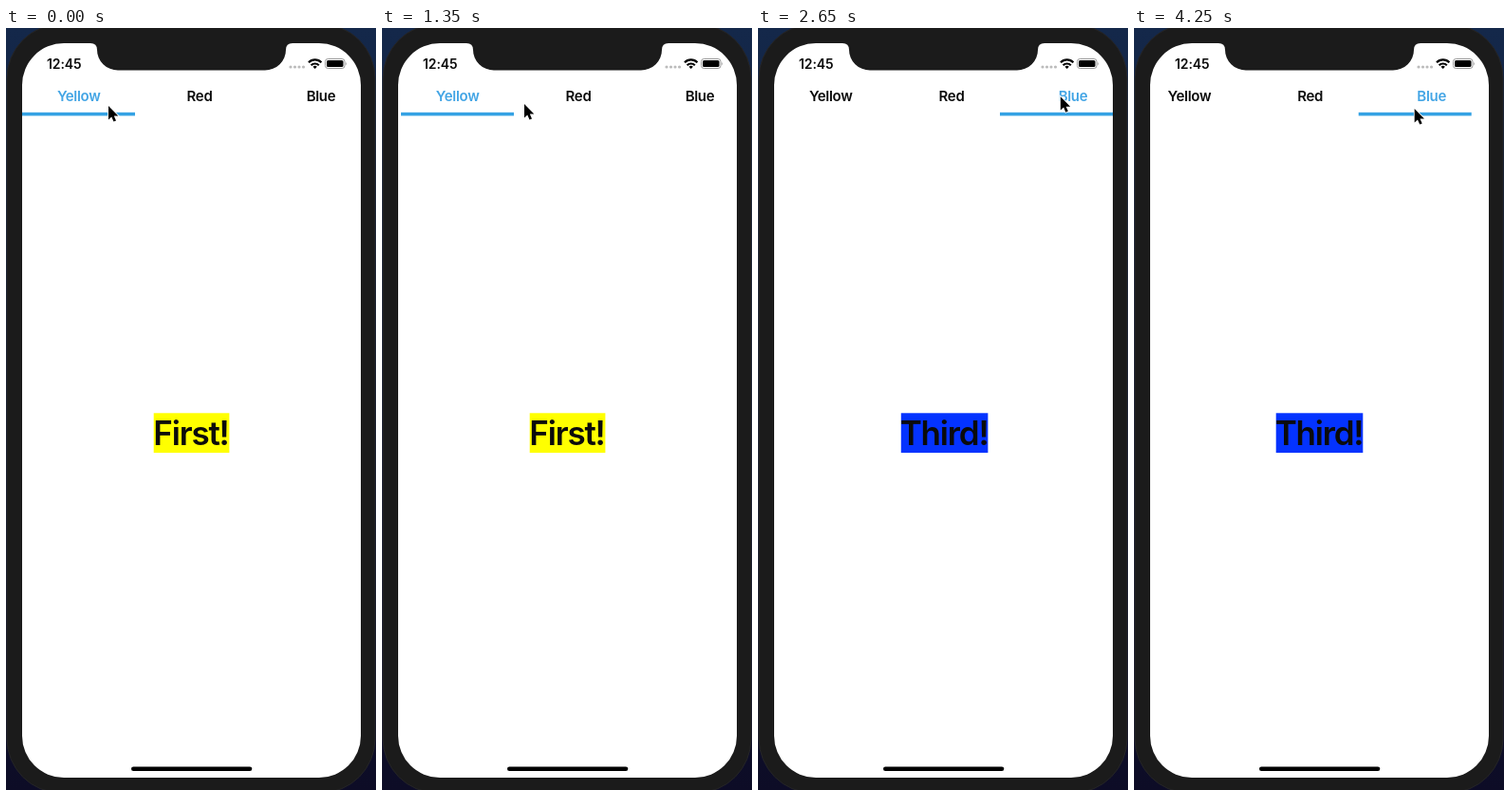
An HTML page that plays this animation: 390x802 px, repeating every 4.3 s.

```html
<!DOCTYPE html>
<html lang="en">
<head>
<meta charset="utf-8">
<title>Paged tabs</title>
<style>
html, body { margin: 0; width: 100%; height: 100%; overflow: hidden; background: #0f1a33; }
svg { display: block; width: 390px; height: 802px; }
text { font-family: Inter, sans-serif; font-weight: 600; fill: #0b0b0b; }
#tabs text { font-size: 15px; letter-spacing: -.3px; text-anchor: middle; }
#tabs .active { fill: #43a5e5; }
#pages text { font-size: 35px; letter-spacing: -1.2px; text-anchor: middle; }
</style>
</head>
<body>
<svg viewBox="0 0 390 802">
  <defs>
    <linearGradient id="desk" x2="0" y2="1">
      <stop stop-color="#14284a"/><stop offset="1" stop-color="#0d0c26"/>
    </linearGradient>
    <path id="glass" d="M17 60A44 44 0 0 1 61 16H89Q96 16 96 23A22 21.5 0 0 0 118 44.5H273A22 21.5 0 0 0 295 23Q295 16 302 16H330A44 44 0 0 1 374 60V745A44 44 0 0 1 330 789H61A44 44 0 0 1 17 745Z"/>
    <clipPath id="screen"><use href="#glass"/></clipPath>
  </defs>
  <rect width="390" height="802" fill="url(#desk)"/>
  <rect x="1" y="-4" width="388" height="809" rx="57" fill="#1b1b1b" stroke="#252527"/>
  <use href="#glass" fill="#fff"/>

  <text x="43" y="43" font-size="14" letter-spacing="-.1">12:45</text>
  <path d="M300 41h14" stroke="#bcbcbc" stroke-width="3.2" stroke-linecap="round" stroke-dasharray="0 4.5"/>
  <g fill="none" stroke="#000" stroke-width="2.2">
    <path d="M319 36.3a9.3 9.3 0 0 1 13.4 0M321.6 39.2a5.8 5.8 0 0 1 8.2 0"/>
  </g>
  <path d="M323.5 40.7a3.2 3.2 0 0 1 4.4 0L325.7 43Z"/>
  <rect x="336.5" y="32.5" width="20.5" height="10" rx="2.8" fill="none" stroke="#999"/>
  <rect x="338" y="34" width="17.5" height="7" rx="1.5"/>
  <path d="M358.3 36a2 2 0 0 1 0 3.2Z" fill="#999"/>

  <g clip-path="url(#screen)">
    <g id="tabs">
      <text x="76.7" y="77">Yellow</text>
      <text x="204" y="77">Red</text>
      <text x="332" y="77">Blue</text>
    </g>
    <rect id="bar" y="88.8" width="119" height="3.6" fill="#35a2e4"/>
    <g id="pages">
      <rect x="155.7" y="405.3" width="79.7" height="41.8" fill="#ff0"/>
      <text x="195" y="438.5">First!</text>
      <rect x="488" y="405.3" width="130" height="41.8" fill="#ff2600"/>
      <text x="552.5" y="438.5">Second!</text>
      <rect x="864.7" y="405.3" width="91.6" height="41.8" fill="#0433ff"/>
      <text x="910" y="438.5">Third!</text>
    </g>
  </g>
  <rect x="132" y="777.5" width="127.3" height="4.6" rx="2.3"/>
  <path id="cursor" d="M0 0V14.4L3.3 11.4 5.5 16.5 8 15.4 5.8 10.5H10.3Z" stroke="#fff" stroke-width="1.6" paint-order="stroke"/>
</svg>
<script>
const LOOP = 4300, STEP = 50;
const TAP_RED = 1972, TAP_BLUE = 2371, RELEASE_RIGHT = 884, RELEASE_LEFT = 3680;
const WIDTH = 357, OVERHANG = 17;

// Pointer path: time, x, y
const path = [
  [0, 108, 82], [880, 302.5, 82], [900, 302.5, 82], [1350, 150, 80], [1650, 286, 82],
  [1850, 194, 76], [1970, 194, 76], [2200, 317, 75], [2400, 317, 75], [2925, 321, 69],
  [3455, 71, 71], [3680, 66, 73], [LOOP, 300, 85.3]
];

const $ = id => document.getElementById(id);
const labels = [...$("tabs").children];
const clamp = v => Math.min(1, Math.max(0, v));
const smooth = v => { v = clamp(v); return v * v * (3 - 2 * v); };
const easeInOut = v => {
  v = clamp(v);
  return v < .5 ? (2 * v) ** 2.6 / 2 : 1 - (2 - 2 * v) ** 2.6 / 2;
};
const rubber = d => WIDTH * (1 - 1 / (Math.max(0, d) * .63 / WIDTH + 1));
const settle = ms => { const a = ms * .01116; return (1 + a) * Math.exp(-a); };
const bothTaps = (t, ease, duration) =>
  ease((t - TAP_RED) / duration) + ease((t - TAP_BLUE) / duration);

function pointer(t) {
  const i = path.findIndex(p => p[0] > t);
  const [t0, x0, y0] = path[i - 1], [t1, x1, y1] = path[i];
  const k = smooth((t - t0) / (t1 - t0));
  return [x0 + (x1 - x0) * k, y0 + (y1 - y0) * k];
}

function tabShift(t, x) {
  if (t < RELEASE_RIGHT) return rubber(x - 118);
  if (t < 2900) return 87.5 * settle(t - RELEASE_RIGHT);
  if (t >= RELEASE_LEFT) return -OVERHANG - 102 * settle(t - RELEASE_LEFT);
  const drag = Math.max(0, 311 - x);
  return -Math.min(drag, OVERHANG) - rubber(drag - OVERHANG);
}

const move = (id, x, y = 0) => $(id).setAttribute("transform", `translate(${x} ${y})`);

function draw(t) {
  const [x, y] = pointer(t), shift = tabShift(t, x);
  const active = (t >= TAP_RED) + (t >= TAP_BLUE);
  labels.forEach((label, i) => label.classList.toggle("active", i === active));
  move("tabs", shift);
  move("bar", 17 + shift + 119 * bothTaps(t, smooth, 172));
  move("pages", -357.5 * bothTaps(t, easeInOut, 300));
  move("cursor", x, y);
}

const start = performance.now();
function tick() {
  const elapsed = performance.now() - start + 8;
  draw(Math.floor(elapsed / STEP) * STEP % LOOP);
  requestAnimationFrame(tick);
}
tick();
</script>
</body>
</html>
```
